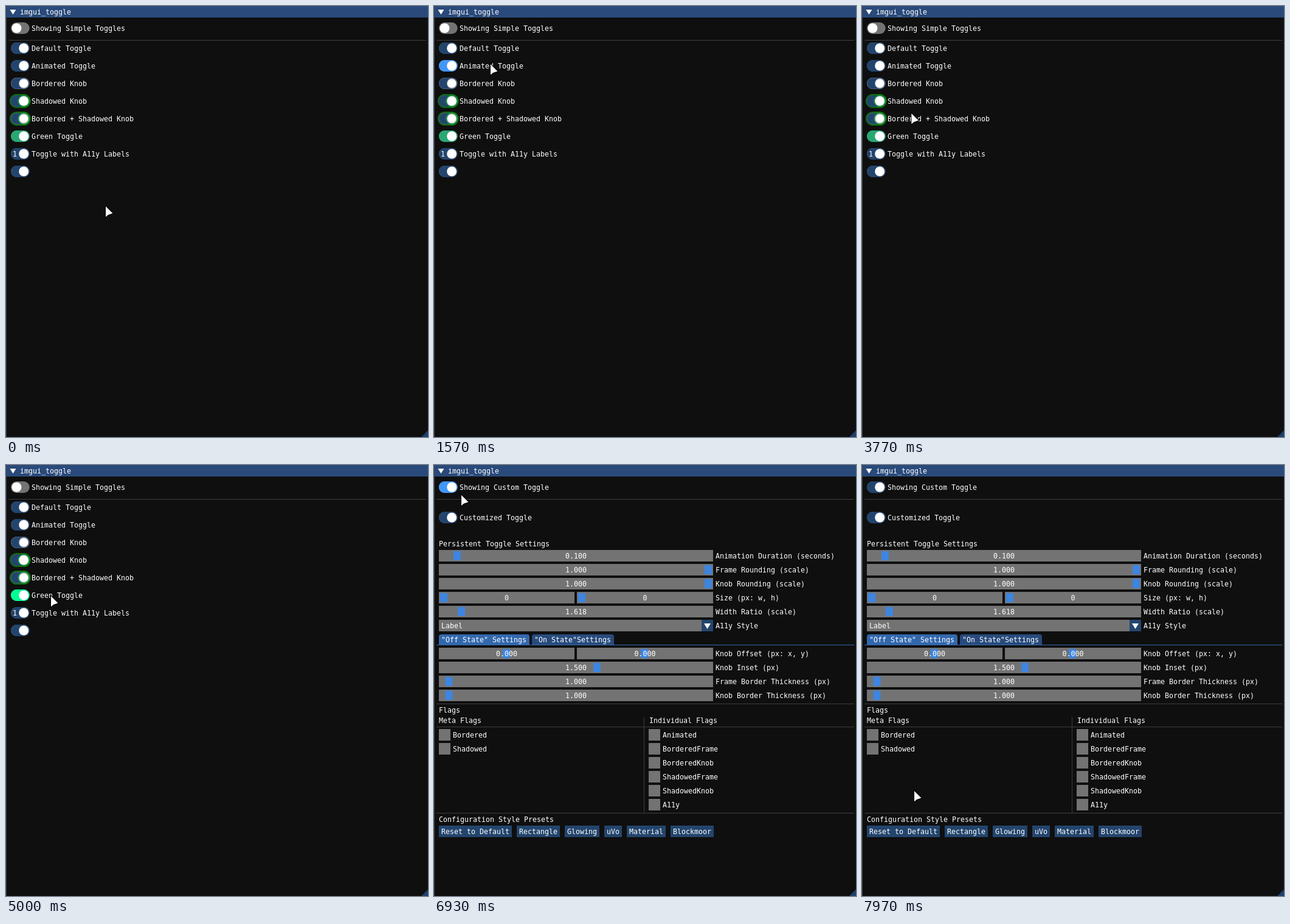
An HTML page with a canvas that plays this animation: 694x710 px, repeating every 8 s.

```html
<!DOCTYPE html>
<html lang="en">
<head>
<meta charset="utf-8">
<title>Toggle demo</title>
<style>
html, body { margin: 0; width: 100%; height: 100%; overflow: hidden; background: #0f0f0f; }
canvas { display: block; }
</style>
</head>
<body>
<canvas id="stage" width="694" height="710"></canvas>
<script>
const ctx = document.getElementById('stage').getContext('2d');
const LOOP = 8000, SWITCH = 6700, HOVER_LAG = 35, SLIDE = 100;
const WHITE = '#fff', GRAY = '#737373', GRAY_HOT = '#a8a8a8';
const BLUE = '#23456d', BLUE_HOT = '#4296fa', GRAB = '#3d85e0';
const LINE = '#3e3e47', BORDER = 'rgba(110,110,128,.5)', GLOW = 'rgba(0,255,0,.4)';

// Pointer keys: time, x, y
const path = [
  [0, 164, 330], [30, 164, 330], [520, 112, 44], [830, 98, 68], [1150, 98, 68],
  [1540, 93, 96], [2130, 93, 96], [2450, 88, 126], [2860, 88, 126],
  [3220, 84, 157], [3600, 84, 157], [3880, 80, 187], [4300, 80, 187],
  [4600, 74, 216], [5030, 74, 216], [5320, 72, 245], [6030, 72, 245],
  [6430, 46, 51], [6560, 45, 39], [6870, 45, 39], [7430, 46, 354],
  [7690, 66, 572], [7860, 84, 524], [7970, 86, 537], [8000, 86, 537]
];

// Toggle rows: label, switched off at, switched on again at, options
const rows = [
  ['Default Toggle', 930, 1150, {}],
  ['Animated Toggle', 1770, 2100, { slide: true }],
  ['Bordered Knob', 2550, 2830, { border: true }],
  ['Shadowed Knob', 3300, 3570, { shadow: true }],
  ['Bordered + Shadowed Knob', 3940, 4270, { border: true, shadow: true }],
  ['Green Toggle', 4670, 4995, { on: '#29a873', onHot: '#00ff92' }],
  ['Toggle with A11y Labels', 5380, 5700, { a11y: true }],
  ['', LOOP, LOOP, {}]
];

let mouse;

const clamp = v => Math.max(0, Math.min(1, v));
const ease = v => v * v * (3 - 2 * v);

function pointer(t) {
  t = Math.max(0, t);
  const i = Math.max(1, path.findIndex(k => k[0] >= t));
  const [t0, x0, y0] = path[i - 1], [t1, x1, y1] = path[i];
  const k = ease(clamp((t - t0) / (t1 - t0)));
  return [x0 + (x1 - x0) * k, y0 + (y1 - y0) * k];
}

function hot(x, y, w, h) {
  return mouse[0] >= x && mouse[0] < x + w && mouse[1] >= y && mouse[1] < y + h;
}

function rect(x, y, w, h, color) {
  ctx.fillStyle = color;
  ctx.fillRect(x, y, w, h);
}

function text(s, x, mid, align = 'left') {
  ctx.textAlign = align;
  ctx.fillStyle = WHITE;
  ctx.fillText(s, x, mid + 4);
}

function poly(color, ...points) {
  ctx.beginPath();
  points.forEach(p => ctx.lineTo(...p));
  ctx.closePath();
  ctx.fillStyle = color;
  ctx.fill();
}

function roundRect(x, y, w, h, r, fill, stroke, width = 1) {
  ctx.beginPath();
  ctx.roundRect(x, y, w, h, r);
  if (fill) { ctx.fillStyle = fill; ctx.fill(); }
  if (stroke) { ctx.strokeStyle = stroke; ctx.lineWidth = width; ctx.stroke(); }
}

function toggle(label, mid, pos, opt = {}) {
  const top = mid - 10, w = 30.7, cy = top + 9.5;
  const over = hot(8, top, label ? 34 + label.length * 7 : w, 19);
  const on = over ? opt.onHot || BLUE_HOT : opt.on || BLUE;
  const off = over ? GRAY_HOT : GRAY;
  if (opt.shadow) roundRect(7, top - 1, w + 2, 21, 10.5, null, GLOW, 2);
  roundRect(8, top, w, 19, 9.5, off);
  ctx.globalAlpha = pos;
  roundRect(8, top, w, 19, 9.5, on);
  ctx.globalAlpha = 1;
  if (opt.border) roundRect(8.5, top + .5, w - 1, 18, 9, null, BORDER);
  if (opt.a11y) pos > .5 ? text('1', 11, mid) : text('0', 28, mid);
  const kx = 17.5 + 11.7 * pos - 8;
  if (opt.shadow) roundRect(kx - 1, cy - 9, 18, 18, 9, null, GLOW, 2);
  roundRect(kx, cy - 8, 16, 16, 8, WHITE);
  if (opt.border) roundRect(kx + .5, cy - 7.5, 15, 15, 7.5, null, BORDER);
  text(label, 42, mid);
}

function slider(x, mid, w, value, grab) {
  const top = mid - 10;
  rect(x, top, w, 19, hot(x, top, w, 19) ? GRAY_HOT : GRAY);
  rect(grab, top + 2, 12, 15, GRAB);
  text(value, x + w / 2, mid, 'center');
}

function wideSlider(label, mid, value, grab) {
  slider(8, mid, 451, value, grab);
  text(label, 463, mid);
}

function pairSlider(label, mid, value, grab) {
  slider(8, mid, 223, value, grab);
  slider(235, mid, 224, value, grab + 227);
  text(label, 463, mid);
}

function checkbox(label, x, mid) {
  const over = hot(x, mid - 10, 23 + label.length * 7, 19);
  rect(x, mid - 10, 19, 19, over ? GRAY_HOT : GRAY);
  text(label, x + 23, mid);
}

function tab(label, x, color) {
  const w = label.length * 7 + 9;
  roundRect(x, 279, w, 17, [4, 4, 0, 0], hot(x, 279, w, 17) ? BLUE_HOT : color);
  text(label, x + 4, 288);
}

function separator(y, color = LINE) {
  rect(4, y, 687, 1, color);
}

function simpleView(t) {
  rows.forEach(([label, off, on, opt], i) => {
    let pos = t >= off && t < on ? 0 : 1;
    if (opt.slide) {
      pos = t < on ? 1 - clamp((t - off) / SLIDE) : clamp((t - on) / SLIDE);
    }
    toggle(label, 70 + 29 * i, pos, opt);
  });
}

function customView() {
  toggle('Customized Toggle', 87, 1);
  text('Persistent Toggle Settings', 8, 130);
  wideSlider('Animation Duration (seconds)', 150, '0.100', 32);
  wideSlider('Frame Rounding (scale)', 173, '1.000', 445);
  wideSlider('Knob Rounding (scale)', 196, '1.000', 445);
  pairSlider('Size (px: w, h)', 219, '0', 10);
  wideSlider('Width Ratio (scale)', 242, '1.618', 39);

  const over = hot(8, 255, 451, 19);
  rect(8, 255, 432, 19, over ? GRAY_HOT : GRAY);
  rect(440, 255, 19, 19, over ? BLUE_HOT : BLUE);
  poly(WHITE, [444, 261], [455, 261], [449.5, 270]);
  text('Label', 12, 265);
  text('A11y Style', 463, 265);

  tab('"Off State" Settings', 8, '#3368ad');
  tab('"On State"Settings', 161, '#284b7d');
  separator(296, '#3368ad');
  pairSlider('Knob Offset (px: x, y)', 311, '0.000', 113);
  wideSlider('Knob Inset (px)', 334, '1.500', 262);
  wideSlider('Frame Border Thickness (px)', 357, '1.000', 18.5);
  wideSlider('Knob Border Thickness (px)', 380, '1.000', 18.5);

  separator(393);
  text('Flags', 8, 404);
  text('Meta Flags', 8, 421);
  text('Individual Flags', 354, 421);
  separator(431);
  rect(345, 415, 1, 158, LINE);
  ['Bordered', 'Shadowed'].forEach((s, i) => checkbox(s, 8, 445 + 23 * i));
  ['Animated', 'BorderedFrame', 'BorderedKnob', 'ShadowedFrame', 'ShadowedKnob', 'A11y']
    .forEach((s, i) => checkbox(s, 353, 445 + 23 * i));
  separator(573);

  text('Configuration Style Presets', 8, 584);
  let x = 8;
  for (const s of ['Reset to Default', 'Rectangle', 'Glowing', 'uVo', 'Material', 'Blockmoor']) {
    const w = s.length * 7 + 8;
    rect(x, 594, w, 19, hot(x, 594, w, 19) ? BLUE_HOT : BLUE);
    text(s, x + 4, 604);
    x += w + 8;
  }
}

function drawPointer([x, y]) {
  ctx.save();
  ctx.translate(x, y);
  ctx.lineWidth = 2;
  ctx.strokeStyle = '#000';
  poly(WHITE, [0, 0], [0, 17.5], [4, 14], [11.5, 11.5]);
  ctx.stroke();
  poly(WHITE, [0, 0], [0, 17.5], [4, 14], [11.5, 11.5]);
  ctx.restore();
}

function draw() {
  const t = performance.now() % LOOP;
  const custom = t >= SWITCH;
  mouse = pointer(t - HOVER_LAG);
  ctx.font = '11.63px "DejaVu Sans Mono", monospace';
  rect(0, 0, 694, 710, '#0f0f0f');
  rect(0, 0, 694, 19, '#294a7a');
  rect(0, 0, 1, 710, LINE);
  poly('#1f3f6c', [694, 699], [694, 710], [683, 710]);
  poly(WHITE, [6.5, 6], [16.5, 6], [11.5, 14]);
  text('imgui_toggle', 23, 10);
  toggle(custom ? 'Showing Custom Toggle' : 'Showing Simple Toggles', 37,
    clamp((t - SWITCH) / SLIDE));
  separator(56);
  custom ? customView() : simpleView(t);
  drawPointer(pointer(t));
  requestAnimationFrame(draw);
}
draw();
</script>
</body>
</html>
```
